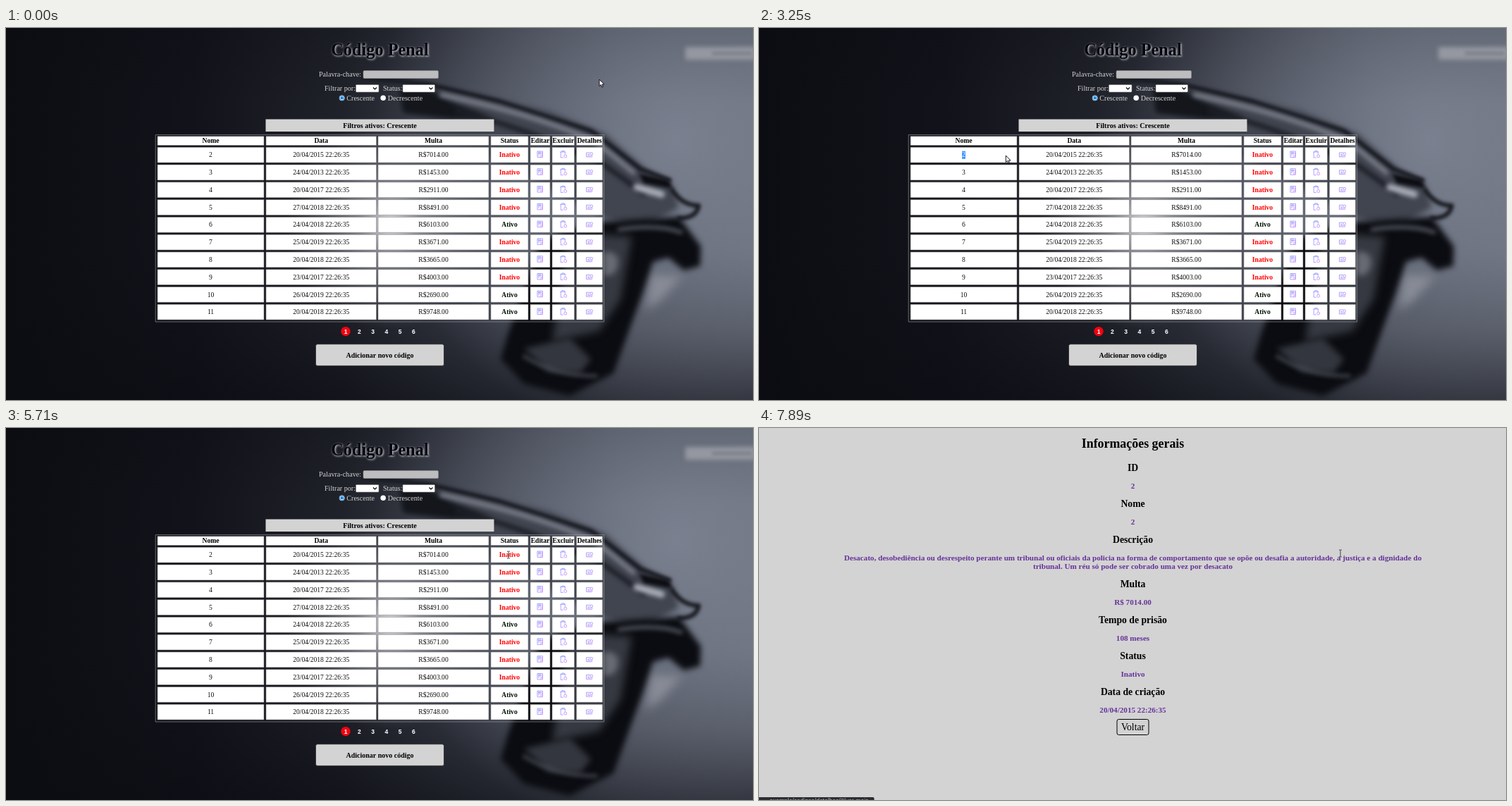
These frames come from a looping animation (1060x528 px, 8000 ms). An HTML page with a canvas:

```html
<!DOCTYPE html>
<html lang="pt">
<head>
<meta charset="utf-8">
<style>
  html, body { margin: 0; width: 100%; height: 100%; overflow: hidden; background: #0d0e13; }
  canvas { display: block; }
</style>
</head>
<body>
<canvas id="stage" width="1060" height="528"></canvas>
<script>
const W = 1060, H = 528, LOOP = 8000, DETAILS_AT = 7890, CLICK_AT = 7710;
const SERIF = '"Liberation Serif", "Times New Roman", serif';
const SANS = '"Liberation Sans", Arial, sans-serif';
const CELL = `9.6px ${SERIF}`, CELL_BOLD = `bold 9.6px ${SERIF}`;
const stage = document.getElementById('stage').getContext('2d');

const COLUMNS = [
  ['Nome', 215, 366], ['Data', 369, 525.5], ['Multa', 528, 685], ['Status', 688, 741],
  ['Editar', 744, 772], ['Excluir', 775, 806.5], ['Detalhes', 809.5, 846.5]
];
const ROWS = [
  ['2', '20/04/2015', 7014, 0], ['3', '24/04/2013', 1453, 0], ['4', '20/04/2017', 2911, 0],
  ['5', '27/04/2018', 8491, 0], ['6', '24/04/2018', 6103, 1], ['7', '25/04/2019', 3671, 0],
  ['8', '20/04/2018', 3665, 0], ['9', '23/04/2017', 4003, 0], ['10', '26/04/2019', 2690, 1],
  ['11', '20/04/2018', 9748, 1]
];
const ROW_PITCH = 24.78, FIRST_BASELINE = 183.3;

function layer(paint) {
  const canvas = document.createElement('canvas');
  canvas.width = W;
  canvas.height = H;
  paint(canvas.getContext('2d'));
  return canvas;
}

function text(c, str, x, y, font, color, align = 'center') {
  c.font = font;
  c.fillStyle = color;
  c.textAlign = align;
  c.fillText(str, x, y);
}

function box(c, x, y, w, h, r, fill, stroke) {
  c.beginPath();
  c.roundRect(x, y, w, h, r);
  if (fill) { c.fillStyle = fill; c.fill(); }
  if (stroke) { c.strokeStyle = stroke; c.stroke(); }
}

function disc(c, x, y, r, fill) {
  c.beginPath();
  c.arc(x, y, r, 0, 7);
  c.fillStyle = fill;
  c.fill();
}

function soft(c, blur, color, path, lineWidth) {
  c.save();
  c.filter = `blur(${blur}px)`;
  c.fillStyle = c.strokeStyle = color;
  if (lineWidth) {
    c.lineWidth = lineWidth;
    c.lineCap = c.lineJoin = 'round';
    c.stroke(new Path2D(path));
  } else c.fill(new Path2D(path));
  c.restore();
}

function wash(c, gradient, stops) {
  stops.forEach(([at, color]) => gradient.addColorStop(at, color));
  c.fillStyle = gradient;
  c.fillRect(0, 0, W, H);
}

function paintBackdrop(c) {
  wash(c, c.createLinearGradient(0, 0, W, 0),
    [[0, '#0c0d12'], [.25, '#12131a'], [.45, '#20222a'], [.62, '#3b3f4a'], [.82, '#585d6a'], [1, '#676c79']]);
  wash(c, c.createLinearGradient(0, 0, 0, H),
    [[0, '#0b0c1240'], [.2, '#0b0c1200'], [.6, '#0b0c1200'], [.8, '#0b0c1240'], [1, '#0b0c12a0']]);
  wash(c, c.createRadialGradient(950, 160, 0, 950, 160, 430),
    [[0, '#868d9cb0'], [.45, '#7c839270'], [1, '#7c839200']]);
  wash(c, c.createRadialGradient(545, 278, 0, 545, 278, 150),
    [[0, '#e4e6eaff'], [.3, '#a8abb4b0'], [1, '#80838c00']]);

  soft(c, 4, '#41454f', 'M556 80L602 78L770 118L850 150L908 200L945 222L955 255L900 285L850 270L620 150L560 122Z');
  soft(c, 4, '#14161c', 'M556 82L600 86L640 108L690 128L630 130L562 122Z');
  soft(c, 2.5, '#16181f', 'M508 70L600 80L700 104L830 146L900 200L942 216', 6);
  soft(c, 3, '#7d828e', 'M618 95Q740 120 835 160L890 205', 6);
  soft(c, 3, '#1d1f27', 'M640 118Q740 142 850 195L905 235', 7);
  soft(c, 3, '#a9adb7', 'M895 226L930 236', 10);
  soft(c, 2.5, '#0c0d12', 'M898 207L940 216L946 228L905 220Z');
  soft(c, 2.5, '#15161c', 'M945 230Q960 252 983 252Q980 270 955 270', 6);
  soft(c, 7, '#888c97', 'M915 350L960 352L930 385L908 400Z');
  soft(c, 4, '#0b0c11', 'M845 275L955 268L986 310L985 338L962 344L940 326L918 332L902 380L882 435L862 490L800 522L735 505L702 470L712 435L760 300Z');
  soft(c, 6, '#363941', 'M800 290L888 296L872 385L842 430L775 445Z');
  soft(c, 4, '#686b73', 'M848 318Q872 316 868 338Q862 356 848 350Z');
  soft(c, 4, '#33363e', 'M735 455L800 440L830 470L815 490L770 488Z');
  soft(c, 3, '#4a4d56', 'M735 466Q780 494 838 494', 4);
  soft(c, 3, '#555963', 'M870 286Q925 278 958 290', 5);
  soft(c, 3, '#9598a1', 'M964 27H1064V45H964Z');
  soft(c, 2, '#7d808a', 'M1004 36H1056', 5);
}

// Small violet line icons: form, bin and card.
const ICONS = [
  'M-4-4.5H3.5V4H-4ZM-2-4V2M0-4V0M1 0V4M3-1V3M-3-2H3',
  'M-4.5-3.5H3.5M-2-3.5V-5H1.5V-3.5M-3.5-3.5V4.5H0M2.5-3.5V0M1 2.5A2 2 0 1 0 5 2.5A2 2 0 1 0 1 2.5',
  'M-4.5-2.5H1M-4.5-2.5V3.5H3.5V1M-3 0H0M-3 1.8H2M1-1A1.8 1.8 0 1 0 4.6-1A1.8 1.8 0 1 0 1-1'
].map(d => new Path2D(d));

function paintIcon(c, icon, x, y) {
  c.save();
  c.translate(x, y);
  const violet = c.createLinearGradient(-4, -4, 4, 4);
  violet.addColorStop(0, '#7f92ff');
  violet.addColorStop(1, '#c880ff');
  c.strokeStyle = violet;
  c.lineWidth = .8;
  c.stroke(icon);
  c.restore();
}

function paintSelect(c, x, w) {
  box(c, x, 80.5, w, 10.5, 1, '#fff', '#777');
  c.beginPath();
  c.moveTo(x + w - 8, 84.5);
  c.lineTo(x + w - 5.5, 87);
  c.lineTo(x + w - 3, 84.5);
  c.strokeStyle = '#000';
  c.lineWidth = 1.2;
  c.stroke();
  c.lineWidth = .6;
}

function paintFilters(c) {
  const label = `10.1px ${SERIF}`, gray = '#d3d3d3';
  c.save();
  c.shadowColor = '#e4e4ea';
  c.shadowBlur = 3;
  c.shadowOffsetX = c.shadowOffsetY = 1;
  text(c, 'Código Penal', 530.5, 38.5, `bold 24.3px ${SERIF}`, '#05050f');
  c.restore();
  c.lineWidth = .6;
  text(c, 'Palavra-chave:', 444, 69, label, gray, 'left');
  box(c, 507, 60.5, 106.5, 11, 1.5, '#bdbdbf', '#8a8a8a');
  text(c, 'Filtrar por:', 452, 88.7, label, gray, 'left');
  paintSelect(c, 496.5, 32.5);
  text(c, 'Status:', 535, 88.7, label, gray, 'left');
  paintSelect(c, 563, 45.5);
  disc(c, 476.7, 99.3, 3.9, '#fff');
  disc(c, 476.7, 99.3, 3.5, '#0a7bd8');
  disc(c, 476.7, 99.3, 2.7, '#fff');
  disc(c, 476.7, 99.3, 2, '#0a7bd8');
  text(c, 'Crescente', 483.3, 102.8, label, gray, 'left');
  disc(c, 535.2, 99.3, 3.8, '#fff');
  text(c, 'Decrescente', 541.8, 102.8, label, gray, 'left');
  box(c, 368.5, 129.5, 324, 17.5, 0, '#d3d3d3');
  text(c, 'Filtros ativos: Crescente', 530.5, 141.5, `bold 10.1px ${SERIF}`, '#000');
}

function paintTable(c) {
  box(c, 212.2, 151.6, 636.3, 265.4, 0, null, '#a3a5ab');
  COLUMNS.forEach(([name, left, right], col) => {
    const mid = (left + right) / 2;
    box(c, left, 153.8, right - left, 12.7, 0, '#fff', '#808080');
    text(c, name, mid, 163.2, CELL_BOLD, '#000');
    ROWS.forEach(([id, date, fine, active], i) => {
      const dy = i * ROW_PITCH, y = FIRST_BASELINE + dy;
      box(c, left, 169.3 + dy, right - left, 21.8, 0, '#fff', '#808080');
      if (col === 3) text(c, active ? 'Ativo' : 'Inativo', mid, y, CELL_BOLD, active ? '#001000' : '#f00');
      else if (col < 3) text(c, [id, date + ' 22:26:35', `R$${fine}.00`][col], mid, y, CELL, '#111');
      else paintIcon(c, ICONS[col - 4], mid, 179.5 + dy);
    });
  });
}

function paintFooter(c) {
  disc(c, 482, 430.6, 6.7, '#f20010');
  for (let n = 1; n <= 6; n++) text(c, n, 462.8 + n * 19.25, 433.7, `bold 8.6px ${SANS}`, '#fff');
  box(c, 439.5, 448.8, 182, 30.6, 2.5, '#d3d3d3', '#111');
  text(c, 'Adicionar novo código', 530.5, 467.5, `bold 10px ${SERIF}`, '#000');
}

const listPage = layer(c => {
  paintBackdrop(c);
  paintFilters(c);
  paintTable(c);
  paintFooter(c);
});

const detailsPage = layer(c => {
  const heading = `bold 13.7px ${SERIF}`, value = `bold 11.15px ${SERIF}`, mid = 530.5;
  c.fillStyle = '#d3d3d3';
  c.fillRect(0, 0, W, H);
  text(c, 'Informações gerais', mid, 27.5, `bold 17.9px ${SERIF}`, '#000');
  let y = 61;
  for (const [title, ...lines] of [
    ['ID', '2'],
    ['Nome', '2'],
    ['Descrição',
      'Desacato, desobediência ou desrespeito perante um tribunal ou oficiais da policia na forma de comportamento que se opõe ou desafia a autoridade, a justiça e a dignidade do',
      'tribunal. Um réu só pode ser cobrado uma vez por desacato'],
    ['Multa', 'R$ 7014.00'],
    ['Tempo de prisão', '108 meses'],
    ['Status', 'Inativo'],
    ['Data de criação', '20/04/2015 22:26:35']
  ]) {
    text(c, title, mid, y, heading, '#000');
    lines.forEach((line, i) => text(c, line, mid, y + 24.9 + i * 12.8, value, '#639'));
    y += 50.8 + (lines.length - 1) * 12.8;
  }
  box(c, 508, 413.5, 45, 22, 2.5, null, '#000');
  text(c, 'Voltar', mid, 428.8, `13.7px ${SERIF}`, '#000');
});

// Pointer path: time, x, y.
const PATH = [
  [0, 842, 73], [1360, 842, 73], [1500, 815, 80], [1750, 640, 128], [1980, 440, 168], [2170, 353, 178],
  [2260, 319, 184], [2380, 296, 185], [2620, 287.5, 179], [2760, 287.5, 179], [2880, 284, 174],
  [3080, 298, 178], [3180, 315, 181], [3430, 441, 181], [3580, 424.5, 180], [3640, 424.5, 180],
  [4160, 466.5, 183], [4260, 510, 183], [4400, 578, 181], [4550, 596, 180], [4640, 596, 180],
  [4950, 629, 182], [5220, 671, 181], [5330, 704, 181], [5460, 704, 181], [5600, 713, 180],
  [5860, 713, 180], [6060, 729, 180], [6200, 765, 181], [6370, 833, 181], [6470, 829, 181],
  [6670, 828, 181], [7120, 825, 178], [LOOP, 825, 178]
];

function pointerAt(t) {
  const i = Math.max(1, PATH.findIndex(p => p[0] > t));
  const [t0, x0, y0] = PATH[i - 1], [t1, x1, y1] = PATH[i];
  const k = (t - t0) / (t1 - t0);
  return [x0 + (x1 - x0) * k, y0 + (y1 - y0) * k];
}

// Text selections: first selected character, drag start, drag end, cleared.
const SELECTIONS = [
  { str: '2', mid: 290.5, font: CELL, first: 0, from: 2880, to: 3080, until: 3560 },
  { str: '20/04/2015 22:26:35', mid: 447.25, font: CELL, first: 4, from: 3640, to: 4170, until: 4390 },
  { str: 'R$7014.00', mid: 606.5, font: CELL, first: 2, from: 4640, to: 4950, until: 5490 },
  { str: 'Inativo', mid: 714.5, font: CELL_BOLD, first: 3, from: 5890, to: 6060, until: DETAILS_AT }
];

function drawSelection(c, { str, mid, font, first, from, to, until }, t) {
  if (t < from || t >= until) return;
  c.font = font;
  const left = mid - c.measureText(str).width / 2;
  const edge = n => left + c.measureText(str.slice(0, n)).width;
  const x = pointerAt(Math.min(t, to))[0];
  let last = first;
  while (last < str.length && (edge(last) + edge(last + 1)) / 2 < x) last++;
  if (last === first) return;
  c.save();
  c.beginPath();
  c.rect(edge(first), 174.8, edge(last) - edge(first), 11);
  c.clip();
  c.fillStyle = '#3390ff';
  c.fillRect(0, 170, W, 20);
  text(c, str, mid, FIRST_BASELINE, font, '#fff');
  c.restore();
}

const ARROW = new Path2D('M0 0V9.5L2.2 7.5L3.8 11L5.3 10.3L3.8 7H6.8Z');
const HAND = new Path2D('M-1 0Q0-1 1 0V4L4 4.5Q5.5 5 5.3 7L4.5 11.5H-.5L-3.2 7.5Q-3 6-1 7.5Z');
const BEAM = new Path2D('M-2-5H-.5L0-4.5L.5-5H2M0-4.5V4.5M-2 5H-.5L0 4.5L.5 5H2');

const LINK_ZONES = [[753, 763], [785, 796], [822, 833]];
const TEXT_ZONES = [[283, 299], [405, 489], [583, 629], [698, 731]];

function pointerShape(t, x, y) {
  const within = (zones, top, bottom) =>
    y > top && y < bottom && zones.some(([left, right]) => x > left && x < right);
  if (t >= CLICK_AT) return BEAM;
  if (within(LINK_ZONES, 173, 186)) return HAND;
  return within(TEXT_ZONES, 173, 184) ? BEAM : ARROW;
}

function drawPointer(c, t) {
  const [x, y] = pointerAt(t), shape = pointerShape(t, x, y);
  c.save();
  c.translate(x, y);
  c.lineWidth = .9;
  c.strokeStyle = shape === BEAM ? '#333' : '#000';
  if (shape !== BEAM) {
    c.fillStyle = '#fff';
    c.fill(shape);
  }
  c.stroke(shape);
  c.restore();
}

const ramp = (t, start, end) => Math.min(1, Math.max(0, (t - start) / (end - start)));

function drawLinkBar(c, t) {
  c.save();
  c.globalAlpha = t < 7200 ? ramp(t, 6550, 6670) - ramp(t, 6900, 7100) : ramp(t, 7290, 7410);
  box(c, -4, 524, 167.5, 12, 2, '#2c2d31');
  text(c, 'exemplo/codigos/detalhes/2/ver-mais', 15, 532, `8.5px ${SANS}`, '#b8bac0', 'left');
  c.restore();
}

function draw(now) {
  const t = now % LOOP, onList = t < DETAILS_AT;
  stage.drawImage(onList ? listPage : detailsPage, 0, 0);
  if (onList) SELECTIONS.forEach(s => drawSelection(stage, s, t));
  drawLinkBar(stage, t);
  drawPointer(stage, t);
}

let start;
function tick(now) {
  start ??= now;
  draw(now - start);
  requestAnimationFrame(tick);
}
draw(0);
requestAnimationFrame(tick);
</script>
</body>
</html>
```
